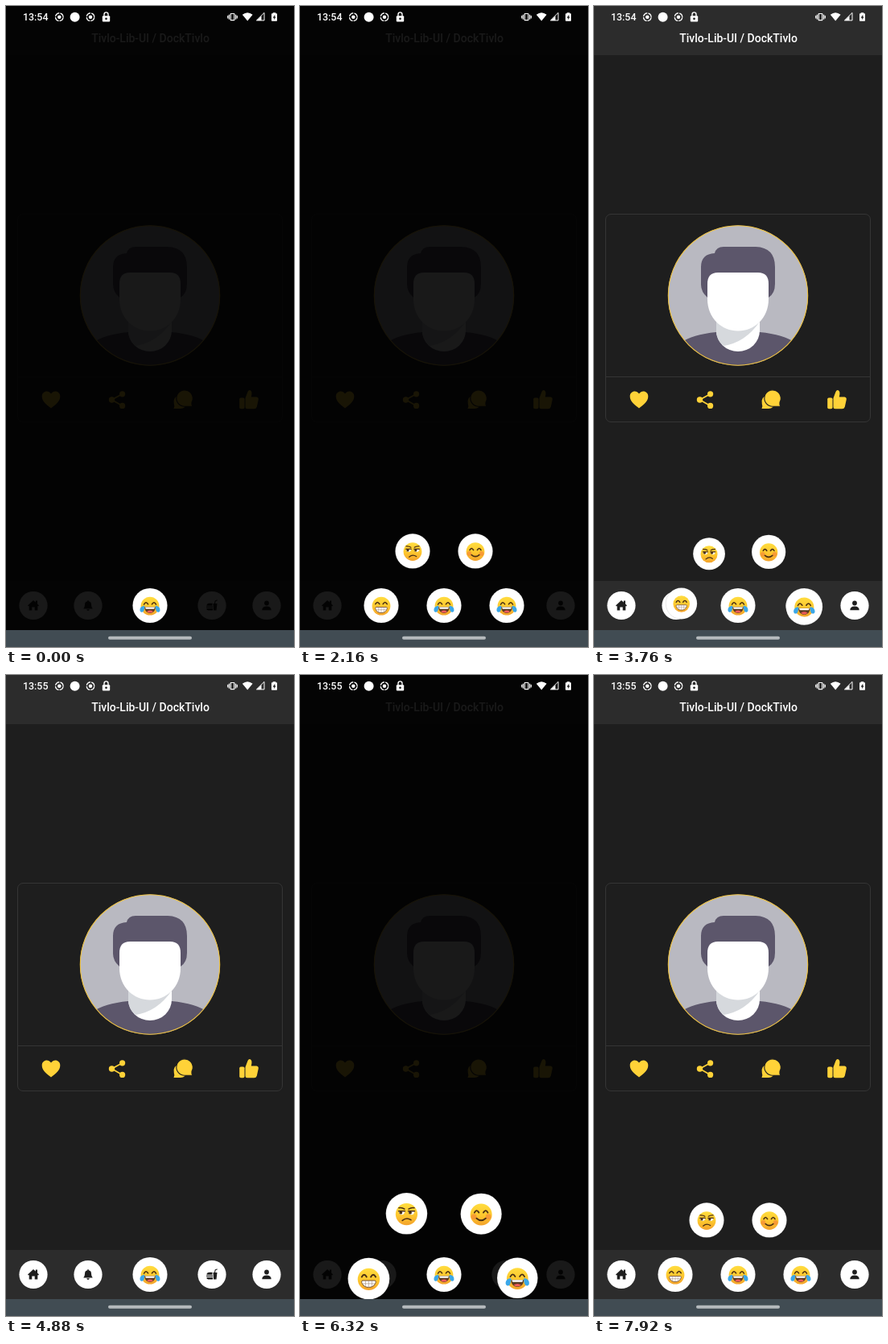
These frames come from a looping animation (358x796 px, 8000 ms). An HTML page:

```html
<!DOCTYPE html>
<html lang="en">
<head>
<meta charset="utf-8">
<title>Radial emoji menu</title>
<style>
  html, body { margin: 0; width: 100%; height: 100%; overflow: hidden; background: #1e1e1e; }
  svg { display: block; width: 100%; height: 100%; }
  text { font-family: Roboto, sans-serif; font-weight: 500; fill: #fff; }
  .line { fill: none; stroke-linecap: round; stroke-linejoin: round; }
</style>
</head>
<body>
<svg viewBox="0 0 358 796">
  <defs>
    <linearGradient id="skin" x2="0" y2="1">
      <stop offset="0" stop-color="#ffdc3e"/><stop offset=".55" stop-color="#fdc72e"/><stop offset="1" stop-color="#f3a22b"/>
    </linearGradient>
    <clipPath id="portrait"><circle cx="179" cy="359.5" r="87"/></clipPath>

    <g id="disc">
      <circle r="21.6" fill="#fff" stroke="#000" stroke-opacity=".22" stroke-width=".5"/>
      <circle cy=".6" r="11.4" fill="url(#skin)"/>
    </g>
    <g id="joy">
      <use href="#disc"/>
      <path class="line" stroke="#4a2f14" stroke-width="1.5" d="M-7.5-1.4Q-5-6-2.4-1.6M2.4-1.6Q5-6 7.5-1.4"/>
      <path fill="#5b3a21" d="M-6.8 1.8H6.8C6.8 6.6 3.8 9.4 0 9.4S-6.8 6.6-6.8 1.8Z"/>
      <path fill="#fff" d="M-6 2H6L5.2 4.2H-5.2Z"/>
      <path fill="#ef5b5b" d="M-4 7.4Q0 4.8 4 7.4Q0 10.6-4 7.4Z"/>
      <path fill="#3ba7e8" d="M-6.8.2C-11 .4-13 3.6-12.4 6.4C-11.8 9-8.2 8.7-7.5 6C-7 4-6.4 2.2-6.8.2ZM6.8.2C11 .4 13 3.6 12.4 6.4C11.8 9 8.2 8.7 7.5 6C7 4 6.4 2.2 6.8.2Z"/>
    </g>
    <g id="grin">
      <use href="#disc"/>
      <path class="line" stroke="#4a2f14" stroke-width="1.6" d="M-7.2-1.8Q-4.7-6.2-2.2-1.8M2.2-1.8Q4.7-6.2 7.2-1.8"/>
      <path fill="#fff" stroke="#6b4527" stroke-width=".8" d="M-6.2 2H6.2C7.8 2 7.4 4 6.8 5C5.4 8 3 9 0 9S-5.4 8-6.8 5C-7.4 4-7.8 2-6.2 2Z"/>
      <path class="line" stroke="#a58b78" stroke-width=".5" d="M-6.6 5.2H6.6M-3.3 2.2V8M0 2.2V8.8M3.3 2.2V8"/>
    </g>
    <g id="bored">
      <use href="#disc"/>
      <path fill="#fff" d="M-8-2.4H-1.8Q-2.2 1.1-5 1.1T-8-2.4ZM2-2.4H8.2Q8 1.1 5.2 1.1T2-2.4Z"/>
      <g fill="#4a2f14"><circle cx="-6" cy="-1" r="1.6"/><circle cx="3.8" cy="-1" r="1.6"/></g>
      <path class="line" stroke="#4a2f14" stroke-width="1.3" d="M-8.3-2.6H-1.7M1.8-2.6H8.4M-8-6Q-4.6-6.6-2.2-4.7M2.2-4.7Q5-6.6 8-6M-4.4 7.2Q0 3.4 4.6 6.6"/>
    </g>
    <g id="smile">
      <use href="#disc"/>
      <g fill="#f47b3a" opacity=".55"><circle cx="-7.6" cy="3" r="2.9"/><circle cx="7.6" cy="3" r="2.9"/></g>
      <path class="line" stroke="#4a2f14" stroke-width="1.6" d="M-7-1.4Q-4.8-5.6-2.4-1.4M2.4-1.4Q4.8-5.6 7-1.4M-4.8 4.6Q0 8.8 4.8 4.6"/>
    </g>
    <g id="aim">
      <circle r="2.3" fill="#fff"/>
      <circle class="line" r="4.8" stroke="#fff" stroke-width="1.2" stroke-dasharray="5.5 2.04" stroke-dashoffset="-1"/>
    </g>
  </defs>

  <rect width="358" height="796" fill="#1e1e1e"/>
  <path fill="#2c2c2c" d="M0 0H358V61H0ZM0 714H358V775H0Z"/>
  <text x="179.5" y="45" font-size="14" text-anchor="middle">Tivlo-Lib-UI / DockTivlo</text>

  <g class="line" stroke="#353535">
    <rect x="14.5" y="258.5" width="329" height="258" rx="6.5"/><path d="M15 460.5H343"/>
  </g>
  <g clip-path="url(#portrait)">
    <rect x="91" y="272" width="176" height="176" fill="#b9b9c1"/>
    <path fill="#5c566b" d="M133 346V324Q133 308 150 307Q152 299 161 299H201Q225 300 225 324V345Q225 357 217 362H141Q133 355 133 346ZM108 450V418Q122 408 152 405H206Q236 408 250 418V450Z"/>
    <path fill="#fff" d="M152 385V403A27 26 0 0 0 206 403V385Z"/>
    <path fill="#d6d9dd" d="M152 385V403Q152 415 161 422Q188 418 206 392V385Z"/>
    <path fill="#fff" d="M141 345Q141 331 154 331H204Q217 331 217 345V364C217 388 199 403.500 179 403.500S141 388 141 364Z"/>
  </g>
  <circle class="line" cx="179" cy="359.5" r="86.7" stroke="#efc23e" stroke-width="1.1"/>

  <g fill="#ffd238">
    <path d="M56 499.500C49 494 44.700 490.500 44.700 484.800C44.700 478.300 52.500 476.300 56 481.500C59.500 476.300 67.300 478.300 67.300 484.800C67.300 490.500 63 494 56 499.500Z"/>
    <circle cx="144.600" cy="481.800" r="3.600"/><circle cx="131.500" cy="489" r="3.700"/><circle cx="144.600" cy="496.400" r="3.600"/>
    <path class="line" stroke="#ffd238" stroke-width="1.700" d="M144.600 481.800L131.500 489L144.600 496.400"/>
    <path d="M208.500 500Q210 497 208.800 494A8.500 8.500 0 1 1 216 500Z"/>
    <path stroke="#1e1e1e" stroke-width="1.100" d="M231.800 497.300H222A10.200 10.200 0 1 1 231 492Q230.500 495 231.800 497.300Z"/>
    <rect x="290.200" y="486.500" width="6.300" height="13.800" rx="1.700"/>
    <path d="M297.500 487L300.300 479.500Q301 476.700 303.200 477Q306.800 478 304.800 485.500H311.500Q314.400 486 313.700 489L311.800 497.800Q311 500.300 308.500 500.300H299.800Q297.500 500.300 297.500 498Z"/>
  </g>

  <g fill="#fff">
    <circle cx="34" cy="744.500" r="17.600"/><circle cx="102" cy="744.500" r="17.600"/>
    <circle cx="256" cy="744.500" r="17.600"/><circle cx="324" cy="744.500" r="17.600"/>
  </g>
  <g fill="#1e1e1e">
    <path d="M27 744.500L34 738L36.800 740.500V738.500H39V742.500L41 744.500L40 745.500L39.300 745V750.500H35.700V746.500H32.300V750.500H28.700V745L28 745.500Z"/>
    <path d="M96.300 748.500Q98 746.800 98 743.500Q98 739.700 101.200 739.200V738.200H102.800V739.200Q106 739.700 106 743.500Q106 746.800 107.700 748.500ZM100.200 749.300H103.800Q103.500 751 102 751T100.200 749.300Z"/>
    <path d="M249.300 744.800Q249.600 741.700 253 741.700H256.500V744.800ZM249 745.800H257V747H249ZM249.300 748H257V750.500H251.200Q249.300 750.300 249.300 748ZM257.500 742H262.500L261.500 750.500H258Z"/>
    <path class="line" stroke="#1e1e1e" stroke-width="1.100" d="M259.500 742L260.200 738.700L262.300 738"/>
    <circle cx="324" cy="741.500" r="2.900"/><path d="M318.300 750.300Q318.300 745.600 324 745.600T329.700 750.300Z"/>
  </g>

  <rect id="shade" width="358" height="775" opacity=".9"/>

  <text id="clock" x="21" y="18.300" font-size="12.400"></text>
  <use href="#aim" x="66.300" y="13.700"/><use href="#aim" x="105" y="13.700"/>
  <circle cx="85.600" cy="13.700" r="6" fill="#fff"/>
  <g fill="#fff">
    <rect x="119.800" y="12.300" width="9.400" height="7.200" rx="1"/>
    <path class="line" stroke="#fff" stroke-width="1.400" d="M122 12.500V10.400A2.500 2.500 0 0 1 127 10.400V12.500"/>
    <circle cx="124.500" cy="15.800" r="1.400" fill="#222"/>
    <path class="line" stroke="#fff" stroke-width="1.200" d="M279.300 9.500H283.700V17.700H279.300ZM277.400 11V16.200M285.600 11V16.200M275.700 12.300V14.900M287.300 12.300V14.900"/>
    <path d="M293.800 10.700Q300.200 5.700 306.600 10.700L300.200 18.500Z"/>
    <path class="line" stroke="#fff" stroke-width="1" d="M321 8.800V17.900H311.800Z"/><path d="M311.800 18L317.500 12.300V18Z"/>
    <path d="M331.700 8.300H335.300V9.300H336.300Q337 9.300 337 10V18Q337 18.800 336.300 18.800H330.700Q330 18.800 330 18V10Q330 9.300 330.700 9.300H331.700Z"/>
    <path fill="#222" d="M334.300 10.800L331.600 14.700H333.200V17.300L335.500 13.500H334.300Z"/>
  </g>

  <g id="bubbles"></g>
  <use href="#joy" x="179" y="744.500"/>

  <rect y="775" width="358" height="21" fill="#414c53"/>
  <rect x="127" y="782.700" width="104" height="4" rx="2" fill="#b5babd"/>
</svg>
<script>
const LOOP = 8000, DURATION = 700, RADIUS = 78, OVERSHOOT = 2.65;
const FIRST_OPEN = 630, CLOSE = 3221, SECOND_OPEN = 5995;
const shade = document.getElementById('shade');
const clock = document.getElementById('clock');
const layer = document.getElementById('bubbles');

const bubbles = ['grin', 'bored', 'smile', 'joy'].map((face, i) => {
  const angle = Math.PI * (1 - i / 3);
  const use = document.createElementNS('http://www.w3.org/2000/svg', 'use');
  use.setAttribute('href', '#' + face);
  use.setAttribute('x', RADIUS * Math.cos(angle));
  use.setAttribute('y', 25.5 - RADIUS * Math.sin(angle));
  layer.append(use);
  return use;
});

const clamp = v => Math.min(1, Math.max(0, v));

// Back easing measured from the open end: 1 at rest, 0 when collapsed.
const backScale = u => 1 + u * u * (OVERSHOOT - (OVERSHOOT + 1) * u);

function opening(elapsed, i) {
  const delay = DURATION * i / 30;
  return backScale(1 - clamp((elapsed - delay) / (DURATION - delay)));
}

function closing(elapsed, i) {
  return backScale(clamp((elapsed - 6 * i * i) / DURATION));
}

function bubbleScale(t, i) {
  if (t < CLOSE) return opening(t - FIRST_OPEN, i);
  if (t < SECOND_OPEN) return closing(t - CLOSE, i);
  return opening(t - SECOND_OPEN, i);
}

function render(t) {
  const dark = t < 2400 || (t >= 5680 && t < 7600);
  shade.style.display = dark ? '' : 'none';
  clock.textContent = t < 4400 ? '13:54' : '13:55';
  bubbles.forEach((bubble, i) => {
    const scale = bubbleScale(t, i);
    bubble.style.display = scale > 0.001 ? '' : 'none';
    bubble.setAttribute('transform', `translate(179 719) scale(${scale})`);
  });
}

const start = performance.now();
function tick() {
  render((performance.now() - start) % LOOP);
  requestAnimationFrame(tick);
}
tick();
</script>
</body>
</html>
```
